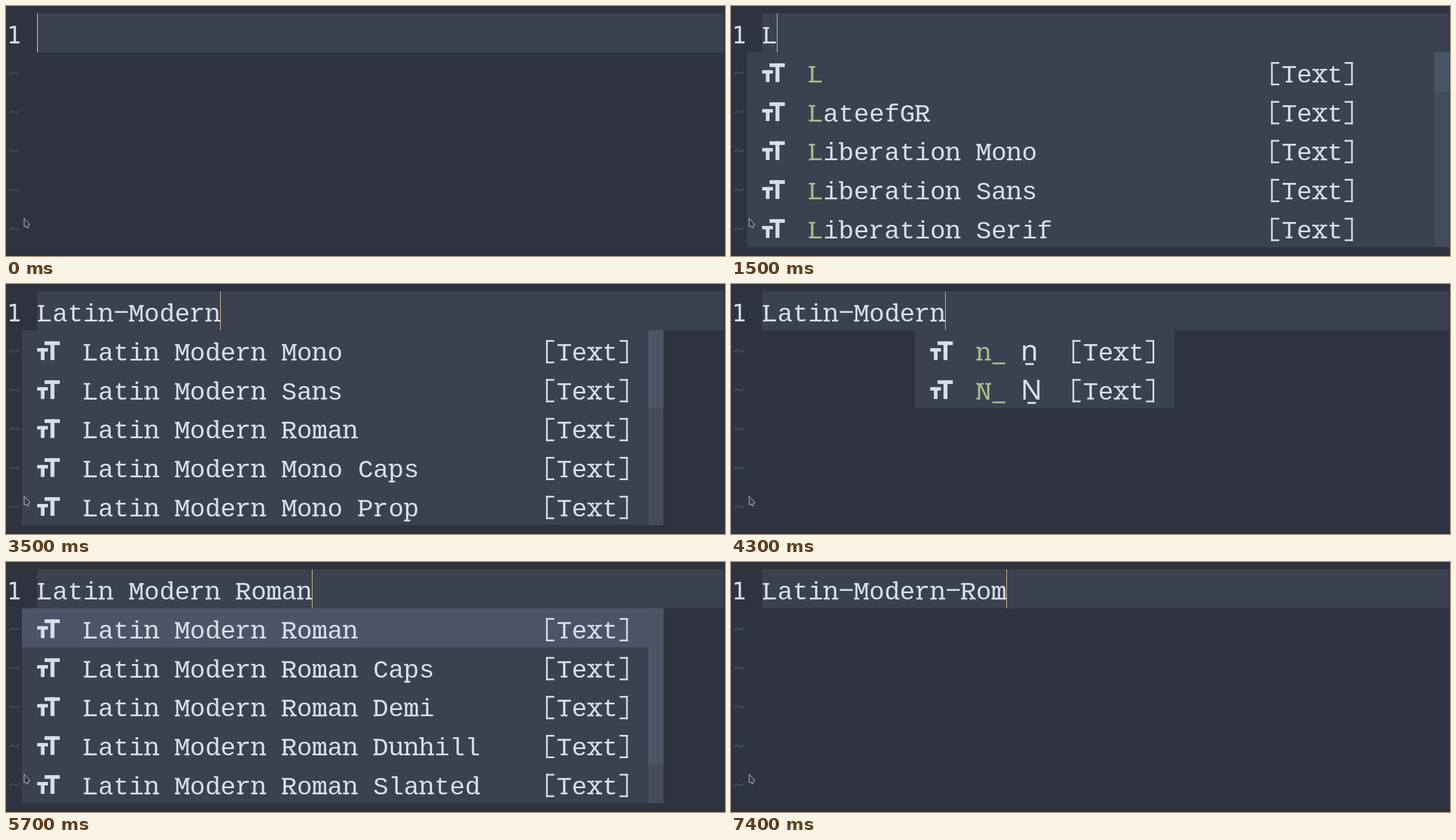
Write an HTML page with a canvas that moves like this. It is 1269x441 px and loops after 8000 ms.

```html
<!DOCTYPE html>
<html lang="en">
<head>
<meta charset="utf-8">
<title>Font name completion</title>
<style>
  html, body { margin: 0; width: 100%; height: 100%; overflow: hidden; background: #2f333f; }
  canvas { display: block; }
</style>
</head>
<body>
<canvas id="stage" width="1269" height="441"></canvas>
<script>
const ctx = document.getElementById('stage').getContext('2d');
const LOOP = 8000, CELL = 26.96, LEFT = 55, TOP = 13, LINE = 68.7, BASE = 53.2;
const MONO = '45px "Liberation Mono", monospace';
const C = {
  bg: '#2f333f', line: '#3c4150', select: '#4b5567', track: '#444b5c',
  text: '#d8dee9', match: '#a3be8c', dim: '#414858', caret: '#ebcb8b'
};

const colX = col => LEFT + col * CELL;
const rowY = row => TOP + row * LINE;

function box(x, y, w, h, color) {
  ctx.fillStyle = color;
  ctx.fillRect(x, y, w, h);
}

// Punctuation made of plain bars, relative to the cell's left edge and baseline
const BARS = {
  '-': [[2.2, -18.5, 23, 3.2]],
  '_': [[2, 3.6, 22.5, 3.2]],
  '[': [[8.5, -36, 3, 41], [8.5, -36, 14.5, 3], [8.5, 2, 14.5, 3]],
  ']': [[15, -36, 3, 41], [3.5, -36, 14.5, 3], [3.5, 2, 14.5, 3]]
};

// Slab serifs: [top, bottom]; l = first stem left, L = all left, r = last stem right, B = all both
const SLABS = {
  L: ['B', 'l'], M: ['l r', 'B'], N: ['B', 'l'], R: ['l', 'B'], D: ['l', 'l'],
  P: ['l', 'B'], T: ['', 'B'], n: ['l', 'B'], m: ['l', 'B'], r: ['l', 'B'],
  h: ['l', 'B'], u: ['L', 'r'], p: ['l', 'B'], d: ['l', 'r'], b: ['l', ''],
  f: ['', 'B'], x: ['B', 'B']
};
const scratch = document.createElement('canvas').getContext('2d', { willReadFrequently: true });
scratch.canvas.width = 44;
scratch.canvas.height = 72;
const slabCache = {};

function inkRuns(y) {
  const px = scratch.getImageData(0, y, 44, 1).data, runs = [];
  let start = -1;
  for (let x = 0; x < 44; x++) {
    const ink = px[x * 4 + 3] > 110;
    if (ink && start < 0) start = x;
    if (!ink && start >= 0) { runs.push([start - 8, x - 8]); start = -1; }
  }
  return runs;
}

function slabsOf(ch) {
  if (slabCache[ch]) return slabCache[ch];
  const out = slabCache[ch] = [];
  if (!SLABS[ch]) return out;
  scratch.clearRect(0, 0, 44, 72);
  scratch.font = MONO;
  scratch.fillText(ch, 8, 48);
  const m = scratch.measureText(ch);
  const edges = [-Math.round(m.actualBoundingBoxAscent), Math.round(m.actualBoundingBoxDescent)];
  edges.forEach((edge, i) => {
    const rule = SLABS[ch][i], y = i ? edge - 3 : edge;
    const runs = inkRuns(48 + (i ? edge - 3 : edge + 2));
    runs.forEach(([a, b], k) => {
      const all = rule.includes('B');
      if (all || rule.includes('L') || (k === 0 && rule.includes('l'))) {
        const x = Math.max(0.5, a - 3.5);
        if (x < a) out.push([x, y, a + 1 - x, 3]);
      }
      if (all || (k === runs.length - 1 && rule.includes('r'))) {
        const x = Math.min(26.5, b + 3.5);
        if (x > b) out.push([b - 1, y, x - b + 1, 3]);
      }
    });
  });
  return out;
}

function write(str, col, row, color = C.text, lit = 0) {
  ctx.font = MONO;
  [...str].forEach((ch, i) => {
    if (ch === ' ') return;
    const x = colX(col + i), y = rowY(row) + BASE;
    ctx.fillStyle = i < lit ? C.match : color;
    if (!BARS[ch]) ctx.fillText(ch, x, y);
    for (const [bx, by, w, h] of BARS[ch] || slabsOf(ch)) ctx.fillRect(x + bx, y + by, w, h);
  });
}

function icon(col, row) {
  const x = colX(col), y = rowY(row);
  box(x + 13, y + 19.5, 27, 6.5, C.text);
  box(x + 23.5, y + 19.5, 7, 33, C.text);
  box(x, y + 31.5, 19, 6, C.text);
  box(x + 6.5, y + 31.5, 6.5, 21, C.text);
}

const family = (name, kinds) => kinds.map(k => `${name} ${k}`.trim());
const modern = family('Latin Modern', ['Mono', 'Sans', 'Roman', 'Mono Caps', 'Mono Prop']);
const roman = family('Latin Modern Roman', ['', 'Caps', 'Demi', 'Dunhill', 'Slanted']);
const liberation = family('Liberation', ['Mono', 'Sans', 'Serif']);

const menu = (items, thumb, lit = 0, end = 40, pick = 0) => ({ items, thumb, lit, end, pick });
const startsL = menu(['L', 'LateefGR', ...liberation], 1, 1, 44);
const startsLa = menu(['La', 'LateefGR', ...modern.slice(0, 3)], 1, 2, 44);
const startsLat = menu(['LateefGR', ...modern.slice(0, 4)], 1, 3, 40);
const allModern = menu(modern, 2);
const DIGRAPH = 'digraph';

// [start, typed line, popup]
const STEPS = [
  [0, '', null],
  [1300, 'L', null],
  [1400, 'L', startsL],
  [1600, 'La', startsL],
  [1700, 'La', startsLa],
  [1800, 'Lat', startsLa],
  [1900, 'Lat', startsLat],
  [2000, 'Lati', startsLat],
  [2100, 'Lati', menu(modern, 2, 4)],
  [2200, 'Latin', menu(modern, 2, 5)],
  [2400, 'Latin-', allModern],
  [2500, 'Latin-M', allModern],
  [2900, 'Latin-Mo', allModern],
  [3100, 'Latin-Mod', allModern],
  [3300, 'Latin-Mode', allModern],
  [3400, 'Latin-Moder', allModern],
  [3500, 'Latin-Modern', allModern],
  [3600, 'Latin-Modern', DIGRAPH],
  [3700, 'Latin-Modern-', DIGRAPH],
  [4300, 'Latin-Modern', DIGRAPH],
  [4500, 'Latin-Modern-', DIGRAPH],
  [4600, 'Latin-Modern-', allModern],
  [4900, 'Latin-Modern-R', allModern],
  [5000, 'Latin-Modern-R', menu(roman, 3)],
  [5100, 'Latin-Modern-Ro', menu(roman, 3)],
  [5200, 'Latin-Modern-Rom', menu(roman, 3)],
  [5300, 'Latin-Modern-Rom', menu(roman, 4)],
  [5700, roman[0], menu(roman, 4, 0, 40, 1)],
  [6000, roman[1], menu(roman, 4, 0, 40, 2)],
  [7300, 'Latin-Modern-Rom', null]
];

function drawMenu({ items, thumb, lit, end, pick }) {
  const x = colX(-1), y = rowY(1), bar = colX(end);
  box(x, y, bar - x, LINE * 5, C.line);
  if (pick) box(x, rowY(pick), bar - x, LINE, C.select);
  box(bar, y, CELL, LINE * 5, C.track);
  box(bar, y, CELL, LINE * thumb, C.select);
  items.forEach((item, i) => {
    icon(0, i + 1);
    write(item, 3, i + 1, C.text, lit);
    write('[Text]', 33, i + 1);
  });
}

function drawDigraphs() {
  box(colX(10), rowY(1), CELL * 17, LINE * 2, C.line);
  [['n_', '\u1e49'], ['N_', '\u1e48']].forEach(([keys, glyph], i) => {
    const row = i + 1;
    icon(11, row);
    write(keys, 14, row, C.match);
    ctx.font = '50px "Noto Sans", sans-serif';
    ctx.fillStyle = C.text;
    ctx.fillText(glyph, colX(17) - 2, rowY(row) + BASE);
    write('[Text]', 20, row);
  });
}

function drawGutter() {
  ctx.font = '42px "DejaVu Sans Mono", monospace';
  ctx.fillStyle = C.text;
  ctx.fillText('1', colX(-2) + 0.4, rowY(0) + BASE);
  ctx.strokeStyle = C.dim;
  ctx.lineWidth = 3;
  for (let row = 1; row < 6; row++) {
    const y = rowY(row) + 36.5;
    ctx.beginPath();
    ctx.moveTo(6.5, y + 2.5);
    ctx.bezierCurveTo(12, y - 8, 17, y + 8, 22.5, y - 2.5);
    ctx.stroke();
  }
}

function drawPointer() {
  ctx.beginPath();
  [[32, 374.5], [32, 389], [35.5, 388.5], [37, 391.5], [39.5, 391], [39, 387.5], [42.5, 385.5]]
    .forEach(([x, y]) => ctx.lineTo(x, y));
  ctx.closePath();
  ctx.fillStyle = '#353946';
  ctx.fill();
  ctx.strokeStyle = '#d5d8de';
  ctx.lineWidth = 1;
  ctx.stroke();
}

function draw(t) {
  const [, line, popup] = STEPS.findLast(s => s[0] <= t);
  box(0, 0, 1269, 441, C.bg);
  box(0, 439, 1269, 2, '#2b2f3a');
  box(LEFT, TOP, 1267 - LEFT, LINE, C.line);
  drawGutter();
  write(line, 0, 0);
  if (popup === DIGRAPH) drawDigraphs();
  else if (popup) drawMenu(popup);
  box(Math.floor(colX(line.length)), TOP, 1, LINE, line ? C.caret : '#eceff4');
  drawPointer();
}

let began;
function tick(now) {
  began ??= now;
  draw((now - began) % LOOP);
  requestAnimationFrame(tick);
}
draw(0);
requestAnimationFrame(tick);
</script>
</body>
</html>
```
